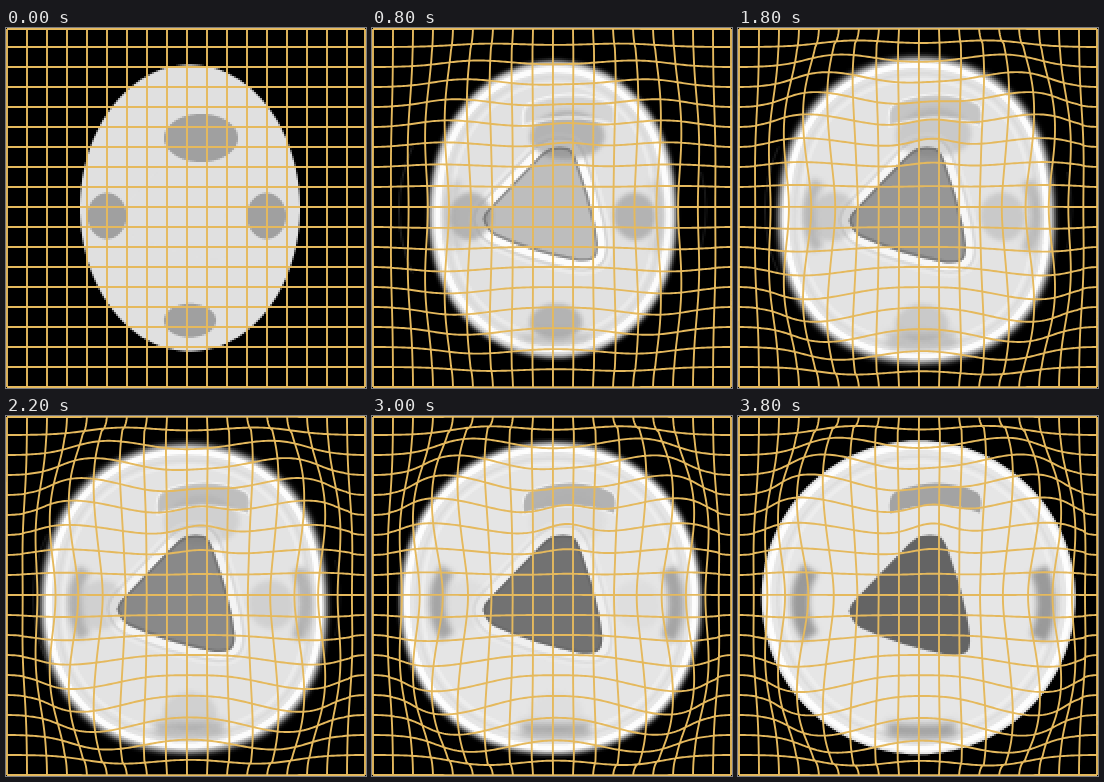
An HTML page with a canvas for the animation above (4000 ms loop, 360 px wide and 360 px high).

```html
<!DOCTYPE html>
<html>
<head>
<meta charset="utf-8">
<title>Grid morph</title>
<style>
  html, body { margin: 0; width: 100%; height: 100%; overflow: hidden; background: #000; }
  canvas { display: block; width: 360px; height: 360px; }
</style>
</head>
<body>
<canvas id="stage" width="360" height="360"></canvas>
<script>
const STEPS = 20, STEP_MS = 200, TAU = Math.PI * 2;
const view = document.getElementById('stage').getContext('2d');
const low = document.createElement('canvas');
low.width = low.height = 180;
const g = low.getContext('2d');

const lerp = (a, b, t) => a + (b - a) * t;
const gray = (v, a = 1) => `rgba(${v},${v},${v},${a})`;
const bell = (x, y, cx, cy, w) => Math.exp(-((x - cx) ** 2 + (y - cy) ** 2) / (2 * w * w));

const C0 = [184, 180], C1 = [180.5, 181.5];
const SPOTS = [[195, 110, 37, 24], [101, 188, 19.5, 23], [260.5, 188, 19.5, 23], [184, 292.5, 26, 17]];

const ellipseR = (c, s) => 1 / Math.hypot(c / 110, s / 143.5);

// Rim of the head in direction (c, s) at progress u, moved inward by inset
function rim(c, s, u, inset = 0) {
  const swell = Math.sin(Math.PI * u);
  const p = u + swell * (0.115 - 0.085 * c + 0.11 * s * s + 0.125 * s);
  const r = lerp(ellipseR(c, s), 157, p) + 5 * swell * (2 * s * c) ** 2 - inset;
  return [lerp(C0[0], C1[0], u) + c * r, lerp(C0[1], C1[1], u) + s * r];
}

// Where a point of the resting picture lies: an outward push in a band around the rim,
// strongest on the diagonals and fading out before the stage border
function warp(x, y, u) {
  const dx = x - C0[0], dy = y - C0[1], r = Math.hypot(dx, dy);
  if (r < 0.01) return [x, y];
  const c = dx / r, s = dy / r, ease = 1 - (1 - u) ** 2;
  const border = Math.max(0, Math.min(1, Math.min(x, y, 360 - x, 360 - y) / 25));
  const band = Math.exp(-(((r - ellipseR(c, s) - 15) / 30) ** 2) / 2);
  const push = ease * border * band * (14 * c * c + 7 * s * s + 18 * (2 * s * c) ** 2);
  const lift = ease * (10 * bell(x, y, 195, 118, 20) + 5 * bell(x, y, 195, 80, 25));
  return [x + c * push, y + s * push - lift];
}

function loop(point, n = 120) {
  const path = new Path2D();
  for (let i = 0; i < n; i++) path.lineTo(...point(Math.cos(i / n * TAU), Math.sin(i / n * TAU)));
  path.closePath();
  return path;
}

const fullWedge = new Path2D(
  'M183 120Q192 118 201 120Q207 123 212 140Q223 170 229 200L232 220Q233 234 227 237' +
  'Q220 241 206 238Q160 229 123 212Q114 207 111 195Q112 188 118 183L140 160L166 133Q176 122 183 120Z');
const cap = new Path2D('M152 97Q150 82 156 77Q174 68 198 67Q224 68 240 77Q245 83 242 97Q222 89 196 89Q172 90 152 97Z');

// The wedge grows a little to the right and down
function wedgeAt(u) {
  const k = lerp(0.935, 1, u);
  const path = new Path2D();
  path.addPath(fullWedge, new DOMMatrix([k, 0, 0, k, 111 * (1 - k), 120 * (1 - k)]));
  return path;
}

function stroke(path, color, width, blur = 0) {
  g.filter = blur ? `blur(${blur}px)` : 'none';
  g.strokeStyle = color;
  g.lineWidth = width;
  g.stroke(path);
  g.filter = 'none';
}

function fill(path, color, blur = 0) {
  g.filter = blur ? `blur(${blur}px)` : 'none';
  g.fillStyle = color;
  g.fill(path);
  g.filter = 'none';
}

function arc(x, y, r, mid, half) {
  const path = new Path2D();
  path.arc(x, y, r, mid - half, mid + half);
  return path;
}

function drawHead(u) {
  const on = u > 0 ? 1 : 0;
  const start = Math.min(1, u * 5);
  const halo = start * (1 - u) ** 0.4;
  const incoming = 0.85 * u ** 0.7;
  const reach = Math.sqrt(u);
  const wedge = wedgeAt(u);

  g.setTransform(1, 0, 0, 1, 0, 0);
  g.fillStyle = '#000';
  g.fillRect(0, 0, 180, 180);
  g.setTransform(0.5, 0, 0, 0.5, 0, 0);

  // Faint echoes of the coming rim
  stroke(arc(182, 182, 155, Math.PI, 0.42), gray(255, 0.13 * halo), 2);
  stroke(arc(180, 182, 154, 0, 0.25), gray(255, 0.1 * halo), 2);

  const head = loop((c, s) => rim(c, s, u));
  fill(head, gray(Math.round(lerp(224, 230, u))), on * (0.4 + Math.sin(Math.PI * u)));

  g.save();
  g.clip(head);
  const ring = (inset, v, a, width) =>
    stroke(loop((c, s) => rim(c, s, u, inset)), gray(v, a * start), width, 0.7);
  ring(lerp(9, 6, u), 255, 0.9, 6);
  ring(16, 210, 0.4, 3);
  ring(22, 255, 0.3, 4);

  // Bright fringe outside the wedge
  stroke(wedge, gray(238, 0.8 * halo), 29, 0.5);
  stroke(wedge, gray(208, 0.8 * halo), 21, 0.5);
  stroke(wedge, gray(255, halo), 15, 0.5);
  fill(wedge, gray(224));

  for (const [x, y, rx, ry] of SPOTS) {
    const spot = loop((c, s) => warp(x + c * rx, y + s * ry, u), 60);
    fill(spot, gray(160, (1 - u) ** 1.5), on * 0.8);
  }

  stroke(cap, gray(255, 0.7 * halo), 4, 0.5);
  fill(cap, gray(160, 0.95 * u), 0.4);

  const thick = lerp(6, 18, u);
  stroke(arc(lerp(88, 62, reach) + 60, 187, 60, Math.PI, 0.6), gray(140, incoming), thick, 1.8);
  stroke(arc(lerp(272, 308, reach) - 90, 188, 90, 0, 0.4), gray(140, incoming), thick, 1.8);
  const chin = lerp(308, 315, reach);
  stroke(new Path2D(`M149 ${chin - 2}Q184 ${chin + 3} 218 ${chin - 2}`), gray(140, incoming), 13, 2);

  fill(wedge, gray(100, 1 - (1 - u) ** 1.4), 0.3);
  g.clip(wedge);
  stroke(wedge, gray(80, 0.5 * halo), 5, 0.4);
  g.restore();
}

function drawGrid(u) {
  view.strokeStyle = '#e5b95d';
  view.lineWidth = 1.9;
  view.lineJoin = 'round';
  view.beginPath();
  const trace = at => {
    for (let t = 1; t <= 359; t += 2) {
      const [x, y] = warp(...at(t), u);
      t === 1 ? view.moveTo(x, y) : view.lineTo(x, y);
    }
  };
  for (let i = 0; i <= 18; i++) {
    const line = Math.min(359, 20 * i + 1);
    trace(t => [line, t]);
    trace(t => [t, 360 - line]);
  }
  view.stroke();
}

const begin = performance.now();
let shown = -1;
function tick() {
  const step = Math.floor((performance.now() - begin) / STEP_MS) % STEPS;
  if (step !== shown) {
    shown = step;
    const u = step / (STEPS - 1);
    drawHead(u);
    view.imageSmoothingEnabled = false;
    view.drawImage(low, 0, 0, 360, 360);
    drawGrid(u);
  }
  requestAnimationFrame(tick);
}
tick();
</script>
</body>
</html>
```
